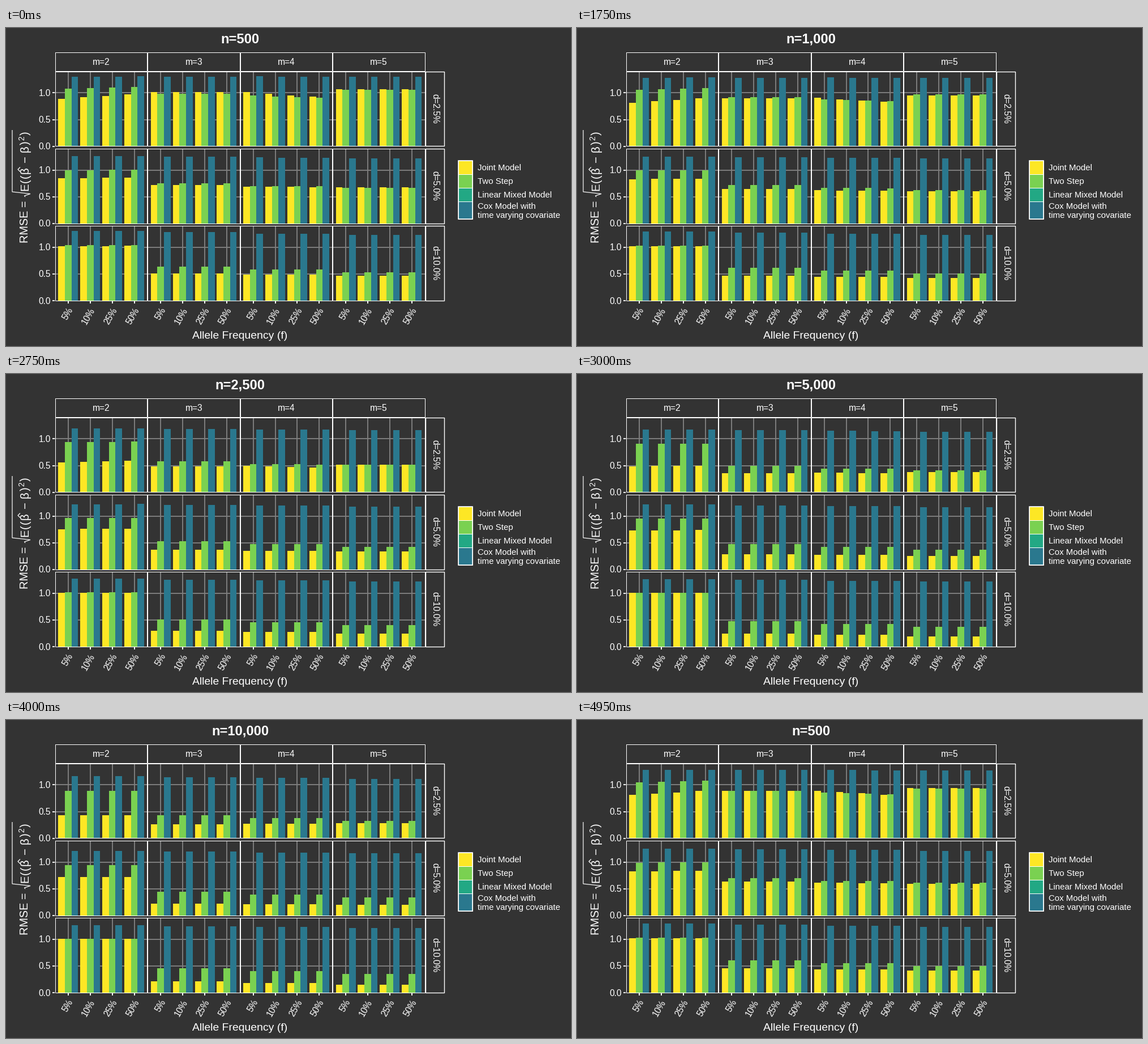
These frames come from a looping animation (998x561 px, 5 s). A matplotlib script:

```python
import numpy as np
import matplotlib.pyplot as plt
from matplotlib.animation import FuncAnimation
from matplotlib.patches import Rectangle

W, H, DPI = 998, 561, 100
BG, GRID = "#333333", "#7f7f7f"
YELLOW, GREEN, TEAL, BLUE = "#fde725", "#7ad151", "#22a884", "#2a788e"
SIZES = [500, 1000, 2500, 5000, 10000]
HOLD, STEPS = 14, 6          # last still frame of a state, tween steps
PER_STATE = HOLD + STEPS

LEFT, COL_W = 86.5, 163.4
BASES = [208.7, 344.8, 480.9]
ROW_H, UNIT = 132.2, 94.3
SLOT = COL_W / 4.2
BAR_W = 0.3 * SLOT

# How far each sample size still is from the large-sample error
JOINT_FADE = np.array([1, .96, .33, .13, 0])
FADE = np.array([1, 1, .3, .11, 0])


def joint(m, k):
    """Error in percent at the smallest and the largest sample size."""
    if m == 2:
        return 93 - 20 * k + 12.3 * k**2, 42.7 + 29 * k
    r = 0.5**k
    bump = 7 * (m - 3) * (m - 4) * 0.1**k
    return (101 - 4 * (m - 3)) * r**0.5 + bump, 15 + 12 * r + (m - 4) * (5 * r - 4)


def two_step(m, k):
    if m == 2:
        return 109.5 - 16 * k + 6.5 * k**2, 88.5 + 6 * k
    bump = 9 * (m - 3) * (m - 4) * 0.1**k
    return 52 - 5.3 * (m - 3) + 46 * 0.5**k + bump, 43.5 + 1.2 * k - 5.5 * (m - 3)


def cox(m, k):
    start = 130.3 - 10.9 * k + 4.5 * k**2 - 1.2 * k * (m - 3.5)
    return start, 116 + 5 * k - 1.6 * (m - 2)


# Each method: colour, error rule, fade, slope over the allele frequencies
METHODS = [(YELLOW, joint, JOINT_FADE, 3), (GREEN, two_step, FADE, 1.3),
           (BLUE, cox, FADE, 0.3)]


def bar_heights(rule, fade, slope, m, k, i):
    """Heights of one bar at every sample size."""
    start, end = rule(m, k)
    tilt = slope * np.cos(np.pi / 2 * m) * 0.1**k * (1.5 - i)
    return (end + (start - end + tilt) * fade) / 100


fig = plt.figure(figsize=(W / DPI, H / DPI), dpi=DPI, facecolor=BG)
ax = fig.add_axes([0, 0, 1, 1])
ax.set_xlim(0, W)
ax.set_ylim(H, 0)
ax.axis("off")


def text(x, y, s, px=15.55, ha="center", rot=0, **kw):
    return ax.text(x, y, s, color="white", fontsize=px * 72 / DPI, ha=ha, va="baseline",
                   rotation=rot, rotation_mode="anchor", family="Liberation Sans", **kw)


def line(xs, ys, color="white", px=1.9, z=1):
    ax.plot(xs, ys, color=color, lw=px * 72 / DPI, zorder=z,
            solid_capstyle="butt", solid_joinstyle="miter")


def box(x0, y0, x1, y1, px=1.0, fill="none", z=4):
    ax.add_patch(Rectangle((x0, y0), x1 - x0, y1 - y0, fc=fill, ec="white",
                           lw=px * 72 / DPI, joinstyle="miter", zorder=z))


# Panels, grids and bars
bars = []
for row, base in enumerate(BASES):
    top = base - ROW_H
    for col in range(4):
        x0 = LEFT + col * COL_W
        x1 = x0 + COL_W
        for v in (0.5, 1):
            line([x0, x1], [base - v * UNIT] * 2, GRID)
        for i in range(4):
            x = x0 + (0.6 + i) * SLOT
            line([x, x], [top, base], GRID)
            for j, (color, *model) in enumerate(METHODS):
                bar = Rectangle((x + (j - 1.5) * BAR_W, base), BAR_W, 0, fc=color,
                                lw=0, antialiased=False, zorder=2)
                ax.add_patch(bar)
                bars.append((bar, base, bar_heights(*model, col + 2, row, i)))
        box(x0 + .5, top, x1 - .5, base - .3)

# Column strips and the x axis
for col in range(4):
    x0 = LEFT + col * COL_W
    box(x0 + .5, 42.6, x0 + COL_W - .5, 75.6)
    text(x0 + COL_W / 2 + .3, 64.6, f"m={col + 2}")
    for i, label in enumerate(("5%", "10%", "25%", "50%")):
        x = x0 + (0.6 + i) * SLOT
        line([x, x], [481, 485.5])
        text(x + 8.8, 497, label, ha="right", rot=60)

# Row strips and the y axis
for base, label in zip(BASES, ("d=2.5%", "d=5.0%", "d=10.0%")):
    box(740.7, base - ROW_H, 774.2, base - .3, 1.4)
    text(753, base - ROW_H / 2, label, rot=-90)
    for v in (0, 0.5, 1):
        y = base - v * UNIT
        line([82, 86.5], [y, y])
        text(79, y + 5.6, f"{v:.1f}", ha="right")

text(413.4, 547.5, "Allele Frequency (f)", 19.44)

# Rotated y title with its root sign
text(39.5, 378.5, "RMSE =", 19.9, ha="left", rot=90)
for y, s in ((280, "E"), (270, "("), (262, "("), (251, "β"), (231, "−"),
             (213, "β"), (202.5, ")"), (185.5, ")")):
    text(39.5, y, s, 20.3, rot=90)
text(32, 194, "2", 13.6, rot=90)
line([25, 21, 25], [253.5, 249.5, 245.5], px=1.3)
line([34, 32.5, 43, 11, 11], [298, 296, 292.5, 289, 180], px=1.2)

# Legend
edges = (234, 258, 282, 306, 337)
for y0, y1, color in zip(edges, edges[1:], (YELLOW, GREEN, TEAL, BLUE)):
    box(799.5, y0, 824, y1, 1, color)
box(799.5, 234, 824, 337, 1.6, z=5)
for y, s in ((251, "Joint Model"), (275.3, "Two Step"), (299.3, "Linear Mixed Model"),
             (318.5, "Cox Model with"), (335, "time varying covariate")):
    text(833, y, s, 15.05, ha="left")

line([0, W], [H - .5] * 2, "#151515", 1)
title = text(413.5, 26.5, "", 23.7, weight="bold")


def draw(frame):
    state, k = divmod(frame, PER_STATE)
    after = (state + 1) % len(SIZES)
    step = max(0, k - HOLD)
    p = step / STEPS
    for bar, base, levels in bars:
        h = UNIT * (levels[state] * (1 - p) + levels[after] * p)
        bar.set_y(base - h)
        bar.set_height(h)
    title.set_text(f"n={SIZES[after if step >= STEPS / 2 else state]:,}")
    return [title] + [b[0] for b in bars]


anim = FuncAnimation(fig, draw, frames=PER_STATE * len(SIZES), interval=50,
                     repeat=True, repeat_delay=0, blit=False)
plt.show()
```
